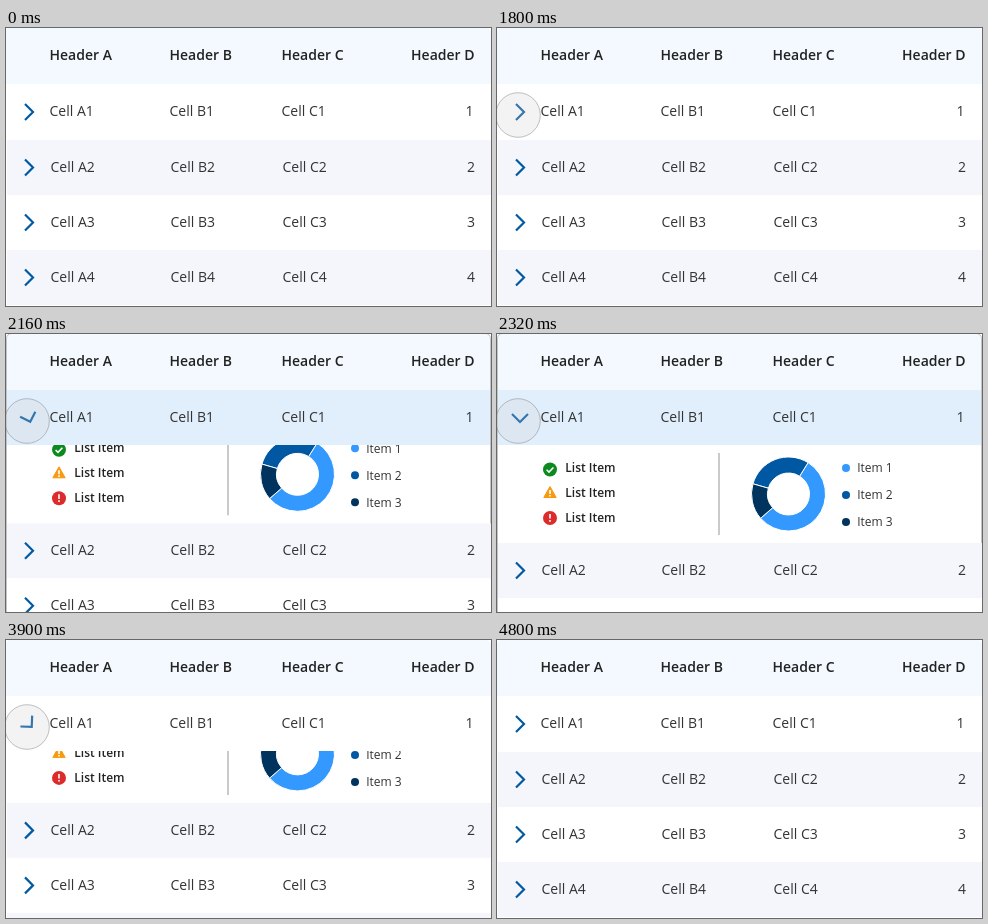
Animation of 485x278 px, one loop 6140 ms. Source, as an HTML page:

```html
<!DOCTYPE html>
<html lang="en">
<head>
<meta charset="utf-8">
<style>
  html, body { margin: 0; width: 100%; height: 100%; overflow: hidden; background: #fff; }
  svg { display: block; width: 485px; height: 278px; }
  text { font: 14px "Open Sans", sans-serif; fill: #333; }
  .bold { font-weight: 600; fill: #222; }
  .small { font-size: 12px; }
  .chevron { fill: none; stroke: #0059a3; stroke-width: 2.2; }
  .mark { fill: none; stroke: #fff; stroke-width: 1.6; }
</style>
</head>
<body>
<svg id="stage" viewBox="0 0 485 278"></svg>
<script>
const LOOP = 6140, PANEL_HEIGHT = 97;
const COLUMNS = [43.5, 163.5, 275.5];
const stage = document.getElementById('stage');

const label = (x, y, content, cls = '', anchor = 'start') =>
  `<text x="${x}" y="${y}" class="${cls}" text-anchor="${anchor}">${content}</text>`;

const box = (x, y, height, fill, extra = '') =>
  `<rect x="${x}" y="${y}" width="${485 - x}" height="${height}" fill="${fill}" ${extra}/>`;

const chevron = (y, id = '') =>
  `<g transform="translate(23 ${y})"><path ${id} class="chevron" d="M-4-8L4 0L-4 8"/></g>`;

function cells(n, baseline, dx, right) {
  return COLUMNS.map((x, i) => label(x + dx, baseline, `Cell ${'ABC'[i]}${n}`)).join('') +
    label(right, baseline, n, '', 'end');
}

function bodyRow(n) {
  const y = 112 + (n - 2) * 55;
  return box(1, y, 55, n % 2 ? '#fff' : '#f5f6fb') +
    chevron(y + 27.5) + cells(n, y + 32, 1, 469);
}

function segment(from, to, color) {
  const point = (deg, r) => {
    const a = deg * Math.PI / 180;
    return `${291.5 + r * Math.sin(a)} ${160 - r * Math.cos(a)}`;
  };
  const large = to - from > 180 ? 1 : 0;
  return `<path fill="${color}" stroke="#fff" d="M${point(from, 37)}A37 37 0 ${large} 1 ${point(to, 37)}` +
    `L${point(to, 21)}A21 21 0 ${large} 0 ${point(from, 21)}Z"/>`;
}

function panel() {
  const icons =
    '<circle cx="53" cy="135.5" r="7" fill="#0c8a1e"/><path class="mark" d="M49.6 135.7l2.4 2.4l4.4-4.6"/>' +
    '<path d="M53 152.5L59.2 163.5H46.8Z" fill="#f79a10" stroke="#f79a10" stroke-linejoin="round"/>' +
    '<path class="mark" d="M53 156v4M53 161v1.6"/>' +
    '<circle cx="53" cy="184" r="7" fill="#dc2b2b"/><path class="mark" d="M53 180v4.6M53 186v1.7"/>';
  const list = [138, 163, 188].map(y => label(68.3, y, 'List Item', 'bold small')).join('');
  const colors = ['#3399ff', '#0058a3', '#00345f'];
  const legend = colors.map((color, i) =>
    `<circle cx="349" cy="${134 + 27 * i}" r="4" fill="${color}"/>` +
    label(360.2, 138.3 + 27 * i, `Item ${i + 1}`, 'small')).join('');
  return icons + list + '<path d="M222 119V201" stroke="#bdbdbd" stroke-width="1.6"/>' +
    segment(32, 229, colors[0]) + segment(286, 392, colors[1]) + segment(229, 286, colors[2]) + legend;
}

stage.innerHTML =
  `<g id="panel">${panel()}</g>` +
  box(0, 0, 56, '#fff') + box(0, 0, 70, '#f3f9fe', 'rx="5"') +
  box(0, 56, 55, '#fff', 'id="first"') +
  COLUMNS.map((x, i) => label(x, 32, `Header ${'ABC'[i]}`, 'bold')).join('') +
  label(468.5, 32, 'Header D', 'bold', 'end') +
  chevron(84, 'id="arrow"') + cells(1, 88, 0, 467.5) +
  '<rect id="border" x=".5" y="-.5" width="484" height="300" rx="5" fill="none" stroke="#c2c4c6"/>' +
  `<g id="rows">${[2, 3, 4].map(bodyRow).join('')}</g>` +
  '<circle id="cursor" r="22.3" stroke="#777" stroke-opacity=".45"/>';

const [panelGroup, first, arrow, border, rows, cursor] =
  ['panel', 'first', 'arrow', 'border', 'rows', 'cursor'].map(id => document.getElementById(id));

const progress = (t, start, end) => Math.min(1, Math.max(0, (t - start) / (end - start)));
const easeOut = p => 1 - (1 - p) ** 2;
const show = (el, on) => el.setAttribute('visibility', on ? 'visible' : 'hidden');

function pressAmount(t) {
  if (t >= 1540 && t < 1580) return 0.5;
  return (t >= 1580 && t < 1800) || (t >= 3600 && t < 3820) ? 1 : 0;
}

function draw(t) {
  const selected = t >= 1980 && t < 3820;
  const open = t < 1980 ? 0
    : selected ? easeOut(progress(t, 1967, 2320))
    : 1 - easeOut(progress(t, 3810, 4140));
  const shift = open * PANEL_HEIGHT;

  rows.setAttribute('transform', `translate(0 ${shift})`);
  panelGroup.setAttribute('transform', `translate(0 ${shift - PANEL_HEIGHT})`);
  show(panelGroup, open > 0);
  arrow.setAttribute('transform', `rotate(${open * 90})`);
  first.setAttribute('fill', selected ? '#e1effd' : '#fff');
  show(border, selected);

  const enter = easeOut(progress(t, 1180, 1400));
  const leave = progress(t, 4650, 4800) ** 1.5;
  cursor.setAttribute('cx', 2 + 19 * enter + 189 * leave);
  cursor.setAttribute('cy', 96 - 9 * enter - 112 * leave);
  const press = pressAmount(t);
  cursor.setAttribute('fill', press ? '#dcdcdc' : '#cecece');
  cursor.setAttribute('fill-opacity', 0.25 + 0.37 * press);
  show(cursor, t >= 1180 && t < 4800);
}

const begin = performance.now();
function tick() {
  draw((performance.now() - begin) % LOOP);
  requestAnimationFrame(tick);
}
tick();
</script>
</body>
</html>
```
